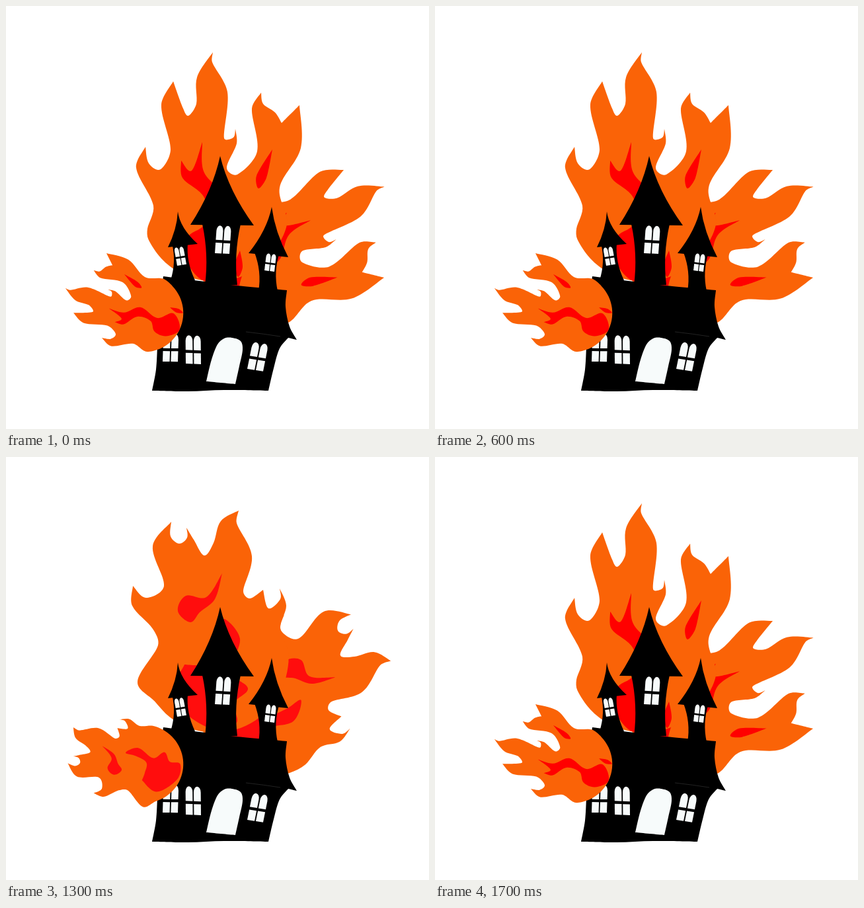
An HTML page with a canvas for the animation above (1800 ms loop, 640x640 px).

```html
<!DOCTYPE html>
<html lang="en">
<head>
<meta charset="utf-8">
<title>Burning castle</title>
<style>
html, body { margin: 0; width: 100%; height: 100%; overflow: hidden; background: #fff; }
canvas { display: block; width: 640px; height: 640px; }
</style>
</head>
<body>
<canvas id="stage" width="640" height="640"></canvas>
<script>
const ctx = document.getElementById('stage').getContext('2d');
const ORANGE = '#fa6307', RED = '#ff0000', SOFT_RED = '#ff0d0d', PANE = '#f7fbfb';

// Key points are written "x,y"; "!" marks a sharp tip.
const parse = text => text.trim().split(/\s+/).map(s => {
  const [x, y] = s.replace('!', '').split(',').map(Number);
  return { x, y, sharp: s.endsWith('!') };
});

// Adds a closed smooth curve through the key points.
function addCurve(path, pts) {
  const n = pts.length, at = i => pts[(i + n) % n];
  path.moveTo(pts[0].x, pts[0].y);
  pts.forEach((a, i) => {
    const b = at(i + 1);
    const before = a.sharp ? a : at(i - 1), after = b.sharp ? b : at(i + 2);
    const len = Math.hypot(b.x - a.x, b.y - a.y);
    const handle = (p, q) => Math.min(1 / 5.5, len / (Math.hypot(q.x - p.x, q.y - p.y) || 1) / 3);
    const ka = handle(before, b), kb = handle(a, after);
    path.bezierCurveTo(
      a.x + (b.x - before.x) * ka, a.y + (b.y - before.y) * ka,
      b.x - (after.x - a.x) * kb, b.y - (after.y - a.y) * kb, b.x, b.y);
  });
  path.closePath();
}

function shapes(...texts) {
  const path = new Path2D();
  texts.forEach(t => addCurve(path, parse(t)));
  return path;
}

// Every flame rests on the same round bowl, swept clockwise between two angles.
function bowl(from, to) {
  const pts = [];
  for (let i = 0; i <= 8; i++) {
    const a = (from + (to - from) * i / 8) * Math.PI / 180;
    pts.push({ x: 316 + 111 * Math.cos(a), y: 306 + 111 * Math.sin(a) });
  }
  return pts;
}

function flame(red, [from, to], tongues, drops, core) {
  const outer = shapes(...drops);
  addCurve(outer, [...parse(tongues), ...bowl(from, to)]);
  return { outer, inner: shapes(...core), red };
}

const poses = {
  A: flame(RED, [10, 155],
    `214,337 223,302 197,245 211,213! 216,238 234,247 249,217 235,150 253,114! 268,155 276,166 288,148 289,108
     313,70! 312,85 335,130 330,200 344,199 347,186! 349,208 334,245 350,255 380,220 372,155
     386,131! 389,148 407,161 417,177! 444,150! 446,215 414,275`,
    [],
    ['297,206! 299,250 328,290 314,345 341,385 303,416 273,385 275,350 300,330 300,290 267,260 265,234! 281,249',
     '354,370! 358,395 351,410 346,392',
     '403,217! 394,260 382,276 379,257']),

  B: flame(SOFT_RED, [15, 150],
    `197,350 202,310 219,288! 227,311 242,290 240,255 222,210 240,180 273,150 267,128! 284,139 291,150 309,132
     317,80! 323,105 355,128 372,162 385,147 386,124! 411,170 391,230 397,246 409,232! 425,262 426,282 411,308`,
    [],
    [`341,187! 350,230 343,265 359,300 346,333 363,375 320,412 275,390 272,340 286,311! 318,322 326,295
      275,270 300,222! 305,255 331,245 321,210`]),

  C: flame(RED, [35, 145],
    `208,350 200,310 200,257! 220,287 232,292 237,225 216,180 230,143! 235,183 246,193 256,180 258,148
     290,98! 328,150 311,220 330,268 358,240 345,190 389,145! 377,180 405,206 420,233 420,263
     439,231! 443,290 431,320 403,342`,
    ['429,116! 438,150 430,167 420,170! 420,160 429,140'],
    ['380,263! 378,297 354,310 356,288',
     '277,295! 297,312 318,355 332,345 330,308! 362,360 345,403 295,408 268,370 273,320']),

  D: flame(SOFT_RED, [10, 145],
    `199,340 230,285 222,260 191,225 192,195! 212,213 239,195 222,135 250,98! 249,120 262,131 274,122
     273,107! 284,125 300,149 314,130 325,97 352,81! 349,100 372,150 359,203 369,214
     389,201! 397,229 415,215 414,199! 424,225 415,258 427,295`,
    [],
    ['327,176! 316,215 293,235 279,250 260,233 272,210 303,212',
     '330,245 354,275 340,325 366,350 345,373 348,403 305,409 252,364 270,314! 292,315 322,310 330,275']),

  E: flame(SOFT_RED, [30, 145],
    `211,350 197,300 250,254 259,215 238,178 273,105! 290,148 270,186 278,197 288,190 296,170! 307,183
     319,156! 336,170 350,197 365,180 362,137! 385,165 380,255 392,265 421,240! 424,280 419,309! 402,335`,
    ['345,67! 360,100 362,137! 340,127 310,123 317,75! 325,83',
     '198,131 203,155 206,187 196,196 179,181 186,155'],
    [`321,249! 326,300 343,317 365,301! 364,330 369,365 345,392 325,418 274,385 270,345
      290,318 280,285 293,277 314,292`])
};

const walls = shapes(
  `238,409! 348,423! 425,430! 423,455 429,485 440,505! 427,502! 414,518 405,548
   397,582! 330,581 275,583 221,582! 227,550 229,515! 220,490! 232,450`);
const door = shapes('303,568! 311,535 320,512 330,503 342,502 355,507 358,520 353,545 347,572!');

// A roof with sagging sides on a body pinched at its waist
function drawTower({ tip: [x, y], eaves: [[lx, ly], [rx, ry]], top: [tl, tr], base: [bl, br], sag }) {
  const inward = ex => (x + ex) / 2 + (x - ex) * sag;
  ctx.beginPath();
  ctx.moveTo(x, y);
  ctx.quadraticCurveTo(inward(rx), (y + ry) / 2, rx, ry);
  ctx.lineTo(lx, ly);
  ctx.quadraticCurveTo(inward(lx), (y + ly) / 2, x, y);
  ctx.fill();

  const floor = 385 + x * .115, eave = Math.min(ly, ry) - 1, waist = (floor + eave) / 2, pinch = 8;
  ctx.beginPath();
  ctx.moveTo(tl, eave);
  ctx.quadraticCurveTo((tl + bl) / 2 + pinch, waist, bl, floor);
  ctx.lineTo(br, floor);
  ctx.quadraticCurveTo((tr + br) / 2 - pinch, waist, tr, eave);
  ctx.fill();
}

const towers = [
  { tip: [324, 227], eaves: [[279, 331], [375, 332]], top: [297, 355], base: [301, 350], sag: .25 },
  { tip: [260, 311], eaves: [[245, 365], [290, 360]], top: [251, 275], base: [249, 286], sag: .4 },
  { tip: [402, 304], eaves: [[367, 374], [427, 380]], top: [376, 414], base: [382, 411], sag: .3 }
];

// Two arched columns with a crossbar; x, y is the bottom-left corner
function drawWindow({ x, y, w, h, lean, slope }) {
  ctx.save();
  ctx.transform(1, slope, -lean, 1, x, y);
  const col = w * .46, low = h * .38, bar = h * .1, r = col / 2;
  for (const left of [0, w - col]) {
    ctx.fillRect(left, -low, col, low);
    ctx.beginPath();
    ctx.moveTo(left, -low - bar);
    ctx.ellipse(left + r, -h + r * 1.6, r, r * 1.6, 0, Math.PI, 0);
    ctx.lineTo(left + col, -low - bar);
    ctx.fill();
  }
  ctx.restore();
}

const windows = [
  { x: 316, y: 374, w: 22, h: 42, lean: .07, slope: .05 },
  { x: 259, y: 393, w: 14, h: 27, lean: -.18, slope: -.16 },
  { x: 391, y: 400, w: 15, h: 26, lean: .12, slope: .13 },
  { x: 272, y: 541, w: 23, h: 43, lean: -.01, slope: .04 },
  { x: 237, y: 538, w: 23, h: 42, lean: .03, slope: .01 },
  { x: 365, y: 549, w: 24, h: 41, lean: .2, slope: .16 }
];

function drawCastle() {
  ctx.fillStyle = '#000';
  ctx.fill(walls);
  towers.forEach(drawTower);
  ctx.strokeStyle = '#333';
  ctx.lineWidth = .7;
  ctx.beginPath();
  ctx.moveTo(363, 493);
  ctx.quadraticCurveTo(390, 496, 415, 500);
  ctx.stroke();
  ctx.fillStyle = PANE;
  ctx.fill(door);
  windows.forEach(drawWindow);
}

// The same flame is reused, scaled and turned by an angle in degrees.
function drawFlame(pose, scale, turn, x, y) {
  ctx.save();
  ctx.translate(x, y);
  ctx.rotate(turn * Math.PI / 180);
  ctx.scale(scale, scale);
  ctx.fillStyle = ORANGE;
  ctx.fill(pose.outer);
  ctx.fillStyle = pose.red;
  ctx.fill(pose.inner);
  ctx.restore();
}

const ORDER = 'ABEABCABCADCBDABEA', STEP = 100;

function draw(time) {
  const pose = poses[ORDER[Math.floor(time / STEP) % ORDER.length]];
  ctx.fillStyle = '#fff';
  ctx.fillRect(0, 0, 640, 640);
  drawFlame(pose, .8954, 58.81, 481, 1.3);
  drawFlame(pose, 1, 0, 0, 0);
  drawCastle();
  drawFlame(pose, .5311, -71.74, 2.4, 573);
}

let start;
function tick(now) {
  start ??= now;
  draw(now - start);
  requestAnimationFrame(tick);
}
draw(0);
requestAnimationFrame(tick);
</script>
</body>
</html>
```
